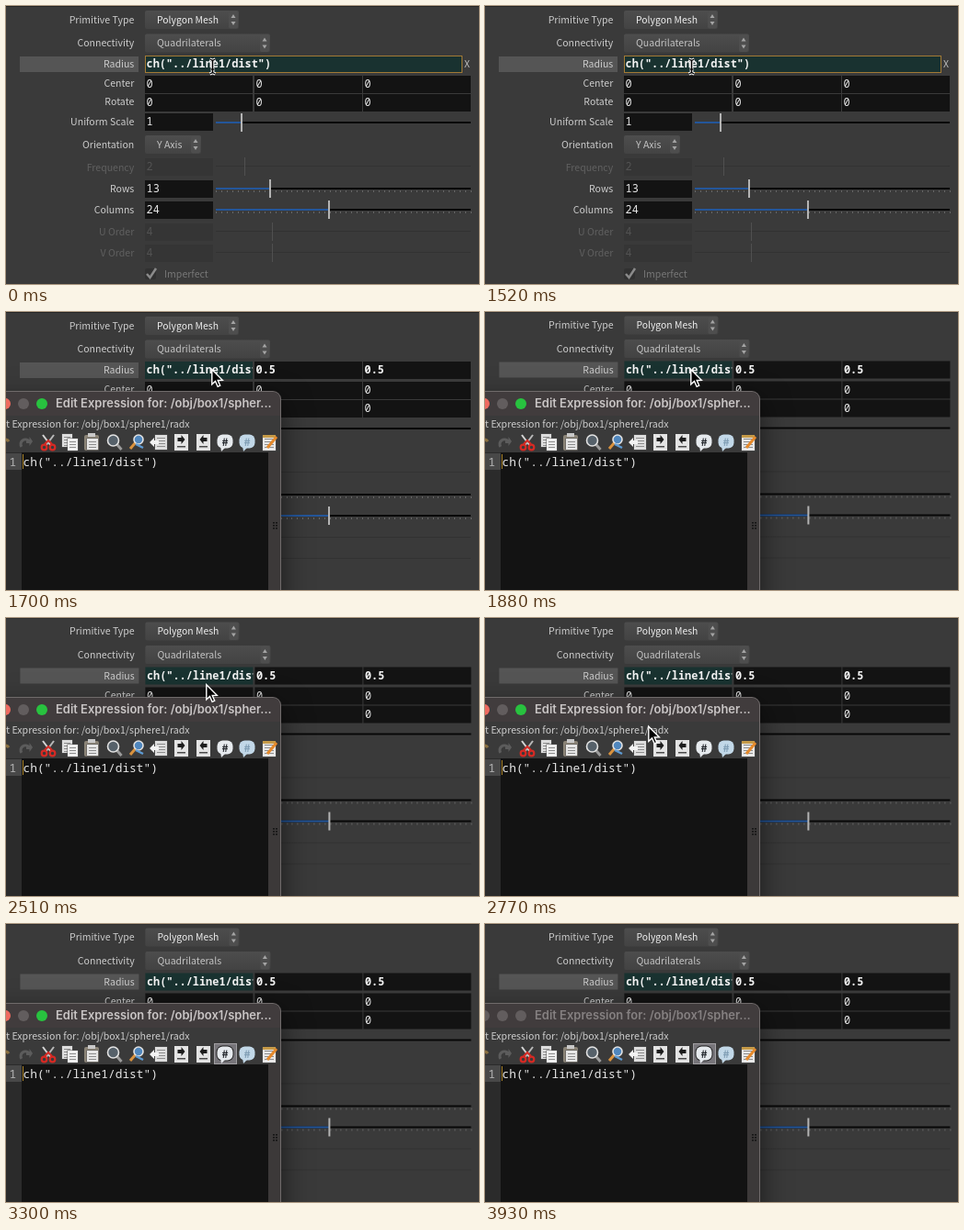
An HTML page with a canvas that plays this animation: 514 by 303 pixels, repeating every 3.95 s.

```html
<!DOCTYPE html>
<html>
<head>
<meta charset="utf-8">
<style>
  html, body { margin: 0; width: 100%; height: 100%; overflow: hidden; background: #3a3a3a; }
  canvas { display: block; }
</style>
</head>
<body>
<canvas id="stage" width="514" height="303"></canvas>
<script>
const c = document.getElementById('stage').getContext('2d');
const LOOP = 3950, OPEN = 1700, SETTLE = 1880, HOVER = 3130, BLUR = 3930;
const UI = '"Noto Sans CJK JP", "Noto Sans CJK SC", "Open Sans", sans-serif';
const MONO = '"Noto Sans Mono", "DejaVu Sans Mono", monospace';
const TITLE = 'Inter, Roboto, sans-serif';
const LABEL = '10.55px ' + UI, VALUE = '11.9px ' + MONO, STRONG = 'bold ' + VALUE, CODE = '12.85px ' + MONO;
const EXPR = 'ch("../line1/dist")';

// Pointer positions, each held until the next time
const pointer = [
  [1700, 223, 62], [2510, 217, 72], [2600, 203, 92], [2690, 186, 110], [2770, 177, 117.5],
  [2860, 175, 126], [2950, 174, 104], [3130, 236, 139], [3220, 391, 275], [3300, 600, 400]
];

function rect(x, y, w, h, fill) {
  c.fillStyle = fill;
  c.fillRect(x, y, w, h);
}

function text(s, x, y, font, fill, align = 'left') {
  c.font = font;
  c.fillStyle = fill;
  c.textAlign = align;
  c.fillText(s, x, y);
}

function poly(points, fill, stroke, width = 1) {
  c.beginPath();
  points.forEach(p => c.lineTo(...p));
  if (fill) { c.closePath(); c.fillStyle = fill; c.fill(); }
  if (stroke) { c.strokeStyle = stroke; c.lineWidth = width; c.stroke(); }
}

function disc(x, y, r, fill, stroke, width = 1) {
  c.beginPath();
  c.arc(x, y, r, 0, 7);
  if (fill) { c.fillStyle = fill; c.fill(); }
  if (stroke) { c.strokeStyle = stroke; c.lineWidth = width; c.stroke(); }
}

function round(x, y, w, h, r, fill) {
  c.beginPath();
  c.roundRect(x, y, w, h, r);
  c.fillStyle = fill;
  c.fill();
}

function label(s, y, off) {
  text(s, 139.3, y + 3.6, LABEL, off ? '#606060' : '#cccccc', 'right');
}

function cell(s, x, y, w, off) {
  rect(x, y - 9, w, 19, off ? '#353535' : '#131313');
  text(s, x + 1.5, y + 4, VALUE, off ? '#535353' : '#e8e8e8');
}

function menu(s, y, w, strong) {
  const g = c.createLinearGradient(0, y - 10, 0, y + 10);
  g.addColorStop(0, '#4d4d4d');
  g.addColorStop(1, '#434343');
  round(151, y - 10, w, 20, 2, g);
  text(s, 164, y + 3.6, strong ? '500 10.4px ' + UI : LABEL, strong ? '#eeeeee' : '#c4c4c4');
  const x = 151 + w - 6;
  round(x - 5, y - 9.5, 10, 19, 2, '#4e4e4e');
  poly([[x - 2.5, y - 2], [x, y - 6], [x + 2.5, y - 2]], '#a4a4a4');
  poly([[x - 2.5, y + 2], [x, y + 6], [x + 2.5, y + 2]], '#a4a4a4');
}

function slider(y, knob, { ticks, off } = {}) {
  if (ticks) {
    for (let i = 0; i <= 47; i++) rect(Math.round(228 + i * 5.89), y + 2, 1, 2, '#666666');
  }
  rect(228, y - 1, 277, off ? 1 : 2, off ? '#323232' : '#080808');
  if (!off) rect(228, y - 1, knob - 228, 2, '#24569a');
  rect(knob - 1, y - 10, off ? 1 : 2, 20, off ? '#505050' : '#b4b4b4');
}

function panel(open) {
  rect(-2, -2, 520, 308, '#3a3a3a');
  rect(-2, -2, 520, 3, '#242424');
  rect(15, 55, 129, 17, '#555555');
  label('Primitive Type', 15);
  label('Connectivity', 40.5);
  label('Radius', 63.5);
  label('Center', 84.5);
  label('Rotate', 104.5);
  label('Uniform Scale', 126.5);
  label('Orientation', 151);
  label('Frequency', 176, true);
  label('Rows', 199);
  label('Columns', 222.5);
  label('U Order', 246, true);
  label('V Order', 269.5, true);
  menu('Polygon Mesh', 15, 102, true);
  menu('Quadrilaterals', 40.5, 136);
  menu('Y Axis', 151, 61);
  for (const y of [85, 105]) {
    for (const x of [151, 270, 388]) cell('0', x, y, 117);
  }
  cell('1', 151, 126, 74);
  cell('2', 151, 175, 74, true);
  cell('13', 151, 199, 74);
  cell('24', 151, 222, 74);
  cell('4', 151, 246, 74, true);
  cell('4', 151, 269, 74, true);
  slider(127, 256);
  slider(175, 260, { off: true });
  slider(199, 287, { ticks: true });
  slider(222, 351, { ticks: true });
  slider(246, 290, { off: true });
  slider(269, 290, { off: true });
  round(151, 286, 12, 12, 2, '#313131');
  poly([[153, 292], [156.5, 296], [163, 286]], null, '#8a8a8a', 2.5);
  text('Imperfect', 172, 295.6, LABEL, '#777777');
  radius(open);
}

function radius(open) {
  if (!open) {
    rect(151, 54, 345, 19, '#a37a35');
    rect(152, 55, 343, 17, '#193230');
    text(EXPR, 152.5, 67, STRONG, '#f4f4f4');
    text('X', 501, 67, LABEL, '#bbbbbb', 'center');
    return;
  }
  rect(151, 54, 117, 19, '#193230');
  c.save();
  c.beginPath();
  c.rect(151, 54, 117, 19);
  c.clip();
  text(EXPR, 152.5, 67, STRONG, '#f4f4f4');
  c.restore();
  for (const x of [270, 388]) {
    rect(x, 54, 117, 19, '#131313');
    text('0.5', x + 1.5, 67, STRONG, '#f4f4f4');
  }
}

function bubble(x, fill, ink) {
  poly([[x - 5, 146], [x - 4, 152], [x + 1, 147]], fill);
  round(x - 8.5, 133.5, 17, 15, 6, fill);
  text('#', x, 145.5, 'bold 12px ' + UI, ink, 'center');
}

function page(x, y, w, h, fill = '#dedede') {
  rect(x - .5, y - .5, w + 1, h + 1, '#555555');
  rect(x, y, w, h, fill);
  for (let i = 3; i < h - 1; i += 3) rect(x + 2, y + i, w - 4, 1, '#8c8c8c');
}

// A horizontal arrow; negative size points left
function arrow(x, y, size, fill) {
  poly([[x, y - 2], [x + size * .5, y - 2], [x + size * .5, y - 5], [x + size, y],
    [x + size * .5, y + 5], [x + size * .5, y + 2], [x, y + 2]], fill);
}

// A magnifier whose handle points to the given side
function lens(x, y, r, side, handle, glass) {
  poly([[x + side * 3, y + 3], [x + side * 9, y + 10]], null, handle, 3);
  disc(x, y, r, glass, '#e2e2e2', 1.6);
}

function toolbar(hover) {
  // Undo and redo
  for (const [x, s, col] of [[-1, -1, '#8a7040'], [21, 1, '#5c5c5c']]) {
    c.beginPath();
    c.arc(x, 144, 5, Math.PI * .8, Math.PI * 1.8);
    c.strokeStyle = col;
    c.lineWidth = 3;
    c.stroke();
    arrow(x + s, 141, s * 7, col);
  }
  // Cut
  poly([[40, 134], [49, 146]], null, '#d4d4d4', 2);
  poly([[52, 134], [43, 146]], null, '#b8b8b8', 2);
  disc(41.5, 147.5, 2.8, null, '#d52a24', 2.2);
  disc(50.5, 147.5, 2.8, null, '#d52a24', 2.2);
  poly([[42, 144], [46, 140], [50, 144]], null, '#d52a24', 2);
  // Copy and paste
  page(61, 133, 11, 14);
  page(67, 138, 11, 13, '#eeeeee');
  round(85, 134, 16, 17, 2, '#8c8578');
  rect(89, 132, 8, 4, '#c8c8c8');
  page(88, 138, 12, 12, '#e6e6e6');
  // Find and replace
  lens(116.5, 140, 6, 1, '#9b9b9b', '#56616a');
  lens(144, 139, 5, -1, '#d8923f', '#4f86bd');
  poly([[141, 144], [149, 148]], null, '#5e9bd3', 2.5);
  // Go to line, indent, outdent
  page(162, 134, 13, 16);
  arrow(166, 142, -10, '#f2f2f2');
  for (const [x, s] of [[190, 1], [214, -1]]) {
    rect(x - 7, 133, 15, 18, '#e4e4e4');
    arrow(x + .5 - s * 4, 139, s * 8, '#1d1d1d');
    rect(x - 4, 146, 9, 1.5, '#4a4a4a');
  }
  // Comment, uncomment
  if (hover) {
    rect(226, 130, 25, 23, '#a19fa2');
    rect(227, 131, 23, 21, '#77757a');
    round(228.5, 132.5, 19, 17, 7, '#252525');
  }
  bubble(238, '#e6eaee', '#20242a');
  bubble(262, '#c2d8e8', '#7f9db4');
  // Notepad
  page(279, 135, 14, 16, '#e8e8e8');
  rect(279, 134, 14, 3, '#c59a48');
  poly([[284, 148], [294, 136]], null, '#e58a2c', 3);
}

function dialog(t) {
  const active = t < BLUR;
  c.save();
  c.shadowColor = 'rgba(0,0,0,.55)';
  c.shadowBlur = 32;
  c.shadowOffsetY = 12;
  round(-30, 86, 329, 240, 9, '#706b6b');
  c.restore();
  round(-30, 87, 328, 240, 8, '#413c3d');

  ['#ee6a5f', '#625d5e', '#28c23f'].forEach((col, i) =>
    disc(-1 + 20 * i, 100, 6, active ? col : '#625d5e'));
  text('Edit Expression for: /obj/box1/spher...', 54, 104, '600 12.95px ' + TITLE,
    active ? '#c9c5c5' : '#858081');

  rect(0, 113, 298, 40, '#3a3a3a');
  text('t Expression for: /obj/box1/sphere1/radx', 0, 125.5, '10.65px ' + UI, '#cccccc');
  toolbar(t >= HOVER);

  rect(0, 153, 285, 150, '#131313');
  rect(0, 153, 17, 150, '#2b2b2b');
  rect(0, 154, 17, 18, '#484848');
  rect(285, 153, 13, 150, '#3c3939');
  rect(18, 155, 1, 16, '#a98226');
  text('1', 3.5, 167.5, CODE, '#b4b4b4');
  text(EXPR, 18.5, 167.5, CODE, '#e6e6e6');
  for (const y of [229, 232, 235]) {
    rect(290, y, 2, 1.5, '#151515');
    rect(293, y, 2, 1.5, '#151515');
  }
}

function beam(x, y) {
  for (const [col, w] of [['#ffffff', 3.2], ['#000000', 1.3]]) {
    poly([[x - 3, y - 8], [x, y - 6.5], [x, y + 6.5], [x - 3, y + 8]], null, col, w);
    poly([[x + 3, y - 8], [x, y - 6.5], [x, y + 6.5], [x + 3, y + 8]], null, col, w);
    poly([[x - 2, y + 3], [x + 2, y + 3]], null, col, w);
  }
}

function cursor(t) {
  if (t < OPEN) return beam(224.5, 66);
  const [, x, y] = pointer.findLast(p => p[0] <= t);
  const shape = [[0, 0], [0, 16], [3.7, 12.6], [6.3, 18.5], [8.9, 17.4], [6.4, 11.7], [11.5, 11.5], [0, 0]]
    .map(([dx, dy]) => [x + .8 + dx, y + .8 + dy]);
  poly(shape, '#000000', '#ffffff', 1.4);
}

function draw(now) {
  const t = now % LOOP;
  c.save();
  if (t >= SETTLE) c.translate(.4, -.5);
  panel(t >= OPEN);
  c.restore();
  if (t >= OPEN) dialog(t);
  cursor(t);
}

const start = performance.now();
function tick() {
  draw(performance.now() - start);
  requestAnimationFrame(tick);
}
tick();
</script>
</body>
</html>
```
